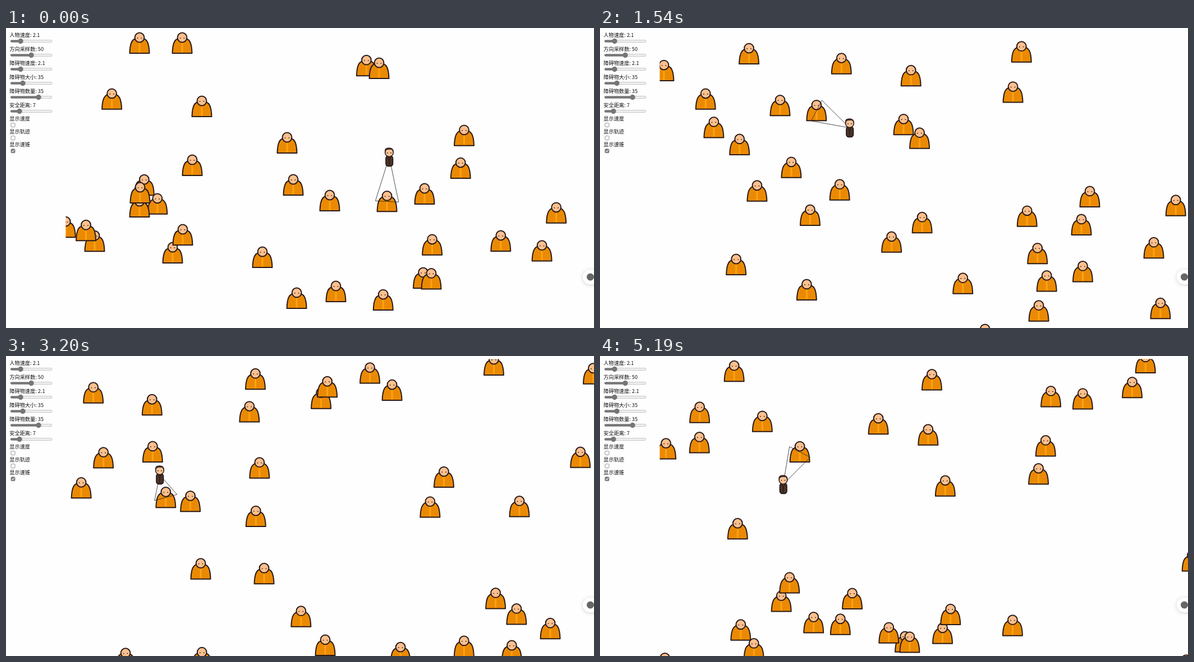
Recreate the animation shown at these times as an HTML page with a canvas. Size 1048 by 535 pixels, loop 5.25 s.

```html
<!DOCTYPE html>
<html lang="zh">
<head>
<meta charset="utf-8">
<title>避障演示</title>
<style>
  html, body { margin: 0; width: 100%; height: 100%; overflow: hidden; background: #fefefe; }
  canvas, svg { position: absolute; left: 0; top: 0; display: block; }
  text { font: 9.2px "Noto Sans CJK SC", "Noto Sans CJK", "Noto Sans", sans-serif; fill: #111; }
</style>
</head>
<body>
<canvas id="stage" width="1048" height="535"></canvas>
<svg id="panel" width="106" height="240"></svg>
<script>
const LOOP = 5250, STEP = 66.5, LAST = 78;
const SPEED = 4.85;
const COUNT = 35;
const FIELD = { left: 106, top: -5, w: 986, h: 580 };
const CONE = 20.7, CLEAR = 37, ROOM = 75;
const INK = '#2b1a17';

// step, x, y of the turns on the hero's way
const route = [
  [0, 683, 230], [16, 528.5, 163], [30, 361.5, 193], [39, 342.5, 179],
  [48, 274, 212], [60, 172.5, 262], [78, 326.5, 229]
];

// the monks the hero meets: start x, start y of the head, heading in degrees
const met = [
  [238, 309, -84.5], [239, 284, -23.9], [297, 391, -98.8], [315, 359, 61.4],
  [577, 298, -93.8], [512, 270, -74.9], [746, 286, 72.4], [501, 195, 131.4],
  [588, 460, -127.8], [457, 399, -137.7], [314, 17, 86.4], [238, 17, 116.5],
  [1045, 549, 60.5], [332, 235, -61.1], [665, 62, 173.2], [349, 130, -43.2]
];

const ctx = document.getElementById('stage').getContext('2d');
const wrap = (v, from, size) => from + (((v - from) % size) + size) % size;

let seed = 35;
const random = () => (seed = seed * 16807 % 2147483647) / 2147483647;

function heroAt(step) {
  let i = 1;
  while (route[i][0] < step) i++;
  const [s0, x0, y0] = route[i - 1], [s1, x1, y1] = route[i];
  const k = (step - s0) / (s1 - s0);
  return { x: x0 + (x1 - x0) * k, y: y0 + (y1 - y0) * k };
}

function monkAt([x, y, deg], step) {
  const a = deg * Math.PI / 180, d = SPEED * step;
  return {
    x: wrap(x + Math.cos(a) * d, FIELD.left, FIELD.w),
    y: wrap(y + Math.sin(a) * d, FIELD.top, FIELD.h)
  };
}

function staysAway(monk) {
  for (let step = 0; step <= LAST; step += 2) {
    const m = monkAt(monk, step), h = heroAt(step);
    if (Math.hypot(m.x - h.x, m.y + 10 - h.y) < ROOM) return false;
  }
  return true;
}

// passers-by start anywhere and never come near the hero
function passerBy() {
  let monk;
  do {
    monk = [FIELD.left + random() * FIELD.w, FIELD.top + random() * FIELD.h, random() * 360];
  } while (!staysAway(monk));
  return monk;
}

const monks = [...Array.from({ length: COUNT - met.length }, passerBy), ...met];

// keep the hero outside the monks it would walk through
function dodge(hero, crowd) {
  for (let n = 0; n < 4; n++) {
    for (const m of crowd) {
      const dx = hero.x - m.x, dy = hero.y - m.y - 10;
      const d = Math.hypot(dx, dy) || 1;
      if (d < CLEAR) {
        hero.x += dx / d * (CLEAR - d);
        hero.y += dy / d * (CLEAR - d);
      }
    }
  }
}

function disc(x, y, r, fill, stroke) {
  ctx.beginPath();
  ctx.arc(x, y, r, 0, Math.PI * 2);
  ctx.fillStyle = fill;
  ctx.fill();
  if (stroke) { ctx.strokeStyle = stroke; ctx.stroke(); }
}

function eyes(y, gap) {
  ctx.fillStyle = INK;
  ctx.fillRect(-gap - 0.9, y, 1.8, 1.4);
  ctx.fillRect(gap - 0.9, y, 1.8, 1.4);
}

function drawMonk({ x, y }) {
  ctx.save();
  ctx.translate(x, y);
  ctx.lineWidth = 2;
  ctx.lineJoin = 'round';
  ctx.beginPath();
  ctx.moveTo(-17.5, 28);
  ctx.bezierCurveTo(-17, 9, -13.5, 0.5, 0, 0.5);
  ctx.bezierCurveTo(13.5, 0.5, 17, 9, 17.5, 28);
  ctx.closePath();
  ctx.fillStyle = '#ea8a04';
  ctx.fill();
  ctx.fillStyle = '#ffa113';
  ctx.fillRect(-1.5, 8, 3, 19);
  ctx.strokeStyle = INK;
  ctx.stroke();
  disc(0, 0, 8.4, '#fcc08e', INK);
  eyes(0.2, 3.4);
  ctx.restore();
}

function drawHero({ x, y }) {
  ctx.save();
  ctx.translate(x, y);
  ctx.lineWidth = 1.6;
  ctx.strokeStyle = '#1d1210';
  ctx.beginPath();
  ctx.roundRect(-6, -2, 12.5, 18.5, 4.5);
  ctx.fillStyle = '#4a3329';
  ctx.fill();
  ctx.stroke();
  ctx.lineWidth = 1;
  ctx.beginPath();
  ctx.moveTo(-3, 0);
  ctx.lineTo(0, 5);
  ctx.lineTo(3, 0);
  ctx.moveTo(0, 5);
  ctx.lineTo(0, 15);
  ctx.stroke();
  ctx.lineWidth = 1.5;
  disc(0, -8, 7.4, '#f9c397', '#1d1210');
  ctx.beginPath();
  ctx.moveTo(-8, -9);
  ctx.quadraticCurveTo(-9, -16, -3, -16.5);
  ctx.quadraticCurveTo(8, -18, 8, -9);
  ctx.lineTo(6, -12.5);
  ctx.quadraticCurveTo(0, -14, -6, -12);
  ctx.closePath();
  ctx.fillStyle = '#3b2a23';
  ctx.fill();
  eyes(-8, 3);
  ctx.restore();
}

function drawCone(hero, crowd) {
  const gap = m => Math.hypot(m.x - hero.x, m.y + 2 - hero.y);
  const near = crowd.reduce((a, b) => gap(b) < gap(a) ? b : a);
  const cx = near.x, cy = near.y + 10;
  const d = Math.hypot(cx - hero.x, cy - hero.y) || 1;
  const px = -(cy - hero.y) / d * CONE, py = (cx - hero.x) / d * CONE;
  ctx.beginPath();
  ctx.moveTo(hero.x, hero.y);
  ctx.lineTo(cx + px, cy + py);
  ctx.lineTo(cx - px, cy - py);
  ctx.closePath();
  ctx.lineWidth = 0.8;
  ctx.strokeStyle = '#222';
  ctx.stroke();
}

function drawButton() {
  ctx.save();
  ctx.shadowColor = 'rgba(0, 0, 0, .18)';
  ctx.shadowBlur = 7;
  ctx.shadowOffsetY = 1;
  ctx.beginPath();
  ctx.roundRect(1028, 431, 40, 26, 13);
  ctx.fillStyle = '#fff';
  ctx.fill();
  ctx.restore();
  disc(1041.5, 444, 6.5, '#666');
}

function draw(time) {
  const step = Math.min(LAST, Math.floor((time % LOOP) / STEP));
  const crowd = monks.map(m => monkAt(m, step));
  const hero = heroAt(step);
  dodge(hero, crowd);
  ctx.clearRect(0, 0, 1048, 535);
  ctx.save();
  ctx.beginPath();
  ctx.rect(106.5, 5.5, 942, 530);
  ctx.clip();
  crowd.forEach(drawMonk);
  drawCone(hero, crowd);
  drawHero(hero);
  ctx.restore();
  drawButton();
}

function buildPanel() {
  const sliders = [
    ['人物速度: 2.1', 26], ['方向采样数: 50', 45], ['障碍物速度: 2.1', 26],
    ['障碍物大小: 35', 30], ['障碍物数量: 35', 58], ['安全距离: 7', 24]
  ];
  const checks = ['显示速度', '显示轨迹', '显示速锥'];
  let out = '';
  sliders.forEach(([label, x], i) => {
    const y = 23.5 + i * 25;
    out += `<text x="6.3" y="${y - 8}">${label}</text>
      <rect x="8" y="${y - 2}" width="74" height="4" rx="2" fill="#efefef" stroke="#b4b4b4" stroke-width=".7"/>
      <rect x="8" y="${y - 2}" width="${x - 8}" height="4" rx="2" fill="#767676"/>
      <circle cx="${x}" cy="${y}" r="4.7" fill="#767676"/>`;
  });
  checks.forEach((label, i) => {
    const y = 173 + i * 23.1, on = i === 2;
    out += `<text x="6.3" y="${y - 8}">${label}</text>
      <rect x="9" y="${y - 3.5}" width="7" height="7" rx="1.5" fill="${on ? '#767676' : '#fff'}" stroke="#767676" stroke-width=".8"/>`;
    if (on) out += `<path d="M10.5 ${y}l1.5 1.7 2.7-3.5" fill="none" stroke="#fff" stroke-width="1.1"/>`;
  });
  document.getElementById('panel').innerHTML = out;
}

buildPanel();
const start = performance.now();
function tick() {
  draw(performance.now() - start);
  requestAnimationFrame(tick);
}
tick();
</script>
</body>
</html>
```
